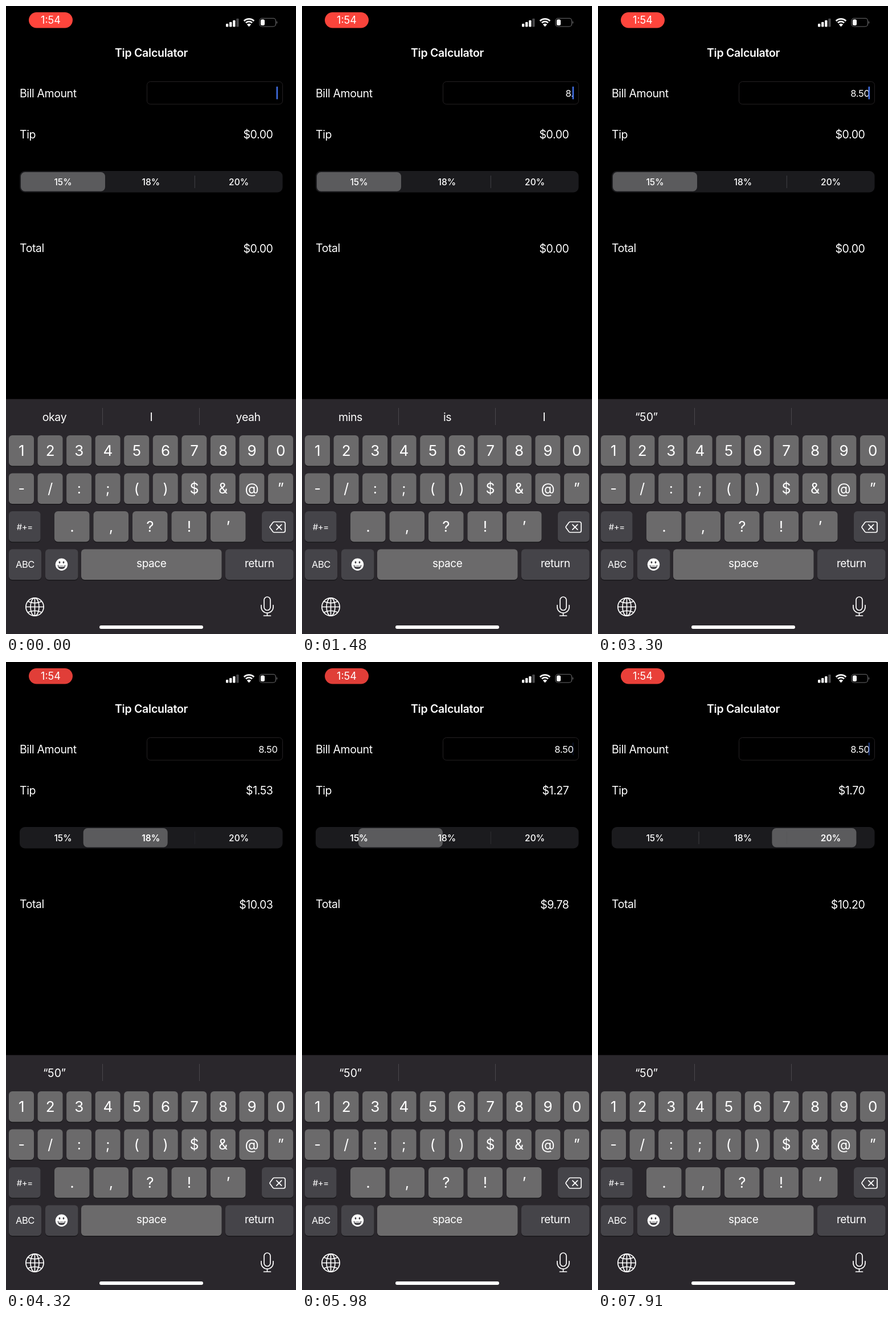
These frames come from a looping animation (509x1100 px, 8000 ms). An HTML page:

```html
<!DOCTYPE html>
<html lang="en">
<head>
<meta charset="utf-8">
<title>Tip Calculator</title>
<style>
html, body { margin: 0; width: 100%; height: 100%; overflow: hidden; background: #000; }
body { position: relative; font-family: Inter, Roboto, sans-serif; }
svg { position: absolute; left: 0; top: 0; display: block; }
text { fill: #fff; font-size: 19.5px; letter-spacing: -.4px; white-space: pre; }
.word { position: absolute; top: 707px; width: 170px; height: 26px; line-height: 26px; text-align: center; color: #fff; font-size: 19.5px; letter-spacing: -.4px; white-space: nowrap; }
.word span { display: inline-block; }
.line { fill: none; stroke: #fff; stroke-width: 1.7; stroke-linecap: round; stroke-linejoin: round; }
</style>
</head>
<body>
<svg id="stage" width="509" height="1100" viewBox="0 0 509 1100"></svg>
<script>
const LOOP = 8000, PULSE = 1692, BLINK = 845;
const BILL = [[0, ''], [450, '8'], [850, '8.'], [1690, '8.5'], [2086, '8.50']];
const WORDS = [[-1000, ['okay', 'I', 'yeah']], [860, ['mins', 'is', 'I']], [1690, ['', '', '']], [2086, ['“50”', '', '']]];
const PICKS = [[-1000, 0, '$0.00', '$0.00'], [4222, 1, '$1.53', '$10.03'], [5910, 0, '$1.27', '$9.78'], [7754, 2, '$1.70', '$10.20']];
const KNOB = [26, 181, 335.5];

const $ = id => document.getElementById(id);
const clamp = v => Math.max(0, Math.min(1, v));
const mix = (a, b, p) => a + (b - a) * p;
const rect = (x, y, w, h, r, fill, more = '') =>
  `<rect x="${x}" y="${y}" width="${w}" height="${h}" rx="${r}" fill="${fill}" ${more}/>`;
const label = (x, y, s, anchor = 'start', style = '', id = '') =>
  `<text x="${x}" y="${y}" text-anchor="${anchor}" style="${style}" id="${id}">${s}</text>`;
const line = (d, more = '') => `<path class="line" d="${d}" ${more}/>`;

function key(x, y, w, s = '', size = 26, dark = false, drop = 9.5) {
  return rect(x, y + 1.5, w, 53.5, 6, '#19181b') + rect(x, y, w, 53.5, 6, dark ? '#454449' : '#6b6a6b') +
    label(x + w / 2, y + 26.7 + drop, s.replace('&', '&amp;'), 'middle', `font-size:${size}px`);
}

function statusBar() {
  let s = rect(40, 11, 77, 27.5, 13.7, '#ff453b', 'id="pill"') +
    label(78.5, 31, '1:54', 'middle', 'font-size:18px;letter-spacing:0');
  for (let i = 0; i < 4; i++)
    s += rect(386 + i * 6.1, 31 - i * 3, 4.3, 5.5 + i * 3, 1.2, i < 3 ? '#fff' : '#48484a');
  const arc = (r, w) => {
    const k = r * Math.SQRT1_2;
    return `<path d="M${426.5 - k} ${35 - k}A${r} ${r} 0 0 1 ${426.5 + k} ${35 - k}" fill="none" stroke="#fff" stroke-width="${w}"/>`;
  };
  return s + arc(12.4, 2.8) + arc(7.8, 2.8) + '<path d="M426.5 36.3l-3.7-4a5.2 5.2 0 0 1 7.4 0z" fill="#fff"/>' +
    rect(445, 21.5, 28.5, 14.5, 4.5, 'none', 'stroke="#68686a" stroke-width="1.2"') +
    rect(447, 23.5, 7, 10.5, 2.5, '#fff') + '<path d="M475 26.3q2.4 2.4 0 5z" fill="#777"/>';
}

function form() {
  let s = label(255, 89, 'Tip Calculator', 'middle', 'font-weight:600;letter-spacing:-.25px') +
    label(24, 160, 'Bill Amount') + label(24, 231.5, 'Tip') + label(24, 431, 'Total') +
    rect(247.5, 132.5, 238, 39.5, 6, 'none', 'stroke="#242123"') +
    label(476.5, 158.5, '', 'end', 'font-size:16.5px;letter-spacing:-.3px', 'bill') +
    rect(474.5, 141, 2.6, 22.5, 1.3, '#416ee2', 'id="caret"') +
    label(468.5, 231.5, '', 'end', '', 'tip') + label(468.5, 432, '', 'end', '', 'total') +
    rect(24, 289, 461.5, 37.5, 9, '#1b1b1e') +
    rect(26, 291, 148, 33.5, 7.5, '#5b5b5d', 'id="knob"') +
    rect(176.5, 297, 1, 22, 0, '#434346', 'id="bar0"') + rect(330.8, 297, 1, 22, 0, '#434346', 'id="bar1"');
  ['15%', '18%', '20%'].forEach((t, i) => {
    s += label(100 + i * 154.3, 313.5, t, 'middle', 'font-size:15.5px;letter-spacing:0;font-weight:500', 'seg' + i);
  });
  return s;
}

function keyboard() {
  let s = rect(0, 688.5, 509, 412, 0, '#2a272c') +
    rect(169, 704, 1, 30, 0, '#49474b') + rect(339, 704, 1, 30, 0, '#49474b');
  ['1234567890', '-/:;()$&@”'].forEach((row, r) => [...row].forEach((c, i) => {
    s += key(5 + i * 50.55, 752 + r * 66.5, 44, c, r ? 25 : 26, false, r ? 8.8 : 9.5);
  }));
  s += key(5, 885, 55.5, '#+=', 15, true, 6.5);
  [...'.,?!’'].forEach((c, i) => { s += key(85 + i * 68.5, 885, 61.5, c, 26); });
  return s + key(449, 885, 55.5, '', 20, true) +
    line('M471 903.5H487q3 0 3 3V919q0 3-3 3H471q-1.4 0-2.4-1L463.5 914q-1-1.3 0-2.6L468.6 904.5q1-1 2.4-1z') +
    line('M474.8 908.3l8.8 8.8m0-8.8l-8.8 8.8') +
    key(5, 951.5, 57, 'ABC', 16.5, true, 6) + key(69, 951.5, 57.5, '', 20, true) +
    key(132, 951.5, 246.5, 'space', 19, false, 5) + key(385, 951.5, 119.5, 'return', 19, true, 5) +
    '<circle cx="97.5" cy="978.3" r="10.7" fill="#fff"/>' +
    '<g fill="#454449"><ellipse cx="94" cy="974.5" rx="1.4" ry="2"/><ellipse cx="101" cy="974.5" rx="1.4" ry="2"/>' +
    '<path d="M90.5 979.2q7 1.8 14 0q-.6 7-7 7t-7-7z"/></g>' +
    line('M92.6 981q4.9 1 9.8 0', 'style="stroke-width:1.5"') +
    '<g class="line"><circle cx="50.5" cy="1052.5" r="15.6"/><ellipse cx="50.5" cy="1052.5" rx="7.5" ry="15.6"/></g>' +
    line('M50.5 1037v31M35 1052.5h31M38.6 1043q11.9 5.5 23.8 0M38.6 1062q11.9-5.5 23.8 0') +
    line('M453 1040.5a5.5 5.5 0 0 1 11 0V1053a5.5 5.5 0 0 1-11 0z') +
    line('M448 1049.5V1053a10.5 10 0 0 0 21 0V1049.5M458.5 1063v5M452.5 1068h12') +
    rect(164, 1085, 182, 6, 3, '#fff');
}

$('stage').innerHTML = statusBar() + form() + keyboard();

// Every prediction is a row of separate letters, so they can come and go one by one.
const words = WORDS.map(([, set]) => set.map((word, col) => {
  const box = document.createElement('div');
  box.className = 'word';
  box.style.left = col * 170 + 'px';
  const letters = [...word].map(c => {
    const span = document.createElement('span');
    span.textContent = c;
    box.append(span);
    return span;
  });
  document.body.append(box);
  return letters;
}));

const lastIndex = (list, t) => list.reduce((found, row, i) => row[0] <= t ? i : found, 0);

function drawWords(t) {
  const now = lastIndex(WORDS, t), age = t - WORDS[now][0];
  words.forEach((set, w) => set.forEach(letters => letters.forEach((span, i) => {
    const fromEnd = letters.length - 1 - i;
    let alpha = 0, scale = 1;
    if (w === now) {
      alpha = clamp((age - 20 * fromEnd) / 40);
      scale = mix(.45, 1, alpha);
    } else if (w === now - 1) {
      alpha = 1 - clamp((age - 20 - 30 * fromEnd) / 100);
    }
    span.style.opacity = alpha;
    span.style.transform = `scale(${scale})`;
  })));
}

function drawPick(t) {
  const n = lastIndex(PICKS, t), [start, to, tip, total] = PICKS[n];
  const from = n ? PICKS[n - 1][1] : 0;
  const k = (t - start) * .025, p = 1 - (1 + k) * Math.exp(-k);
  const shown = (pick, bar) => pick === bar || pick === bar + 1 ? 0 : 1;
  $('knob').setAttribute('x', mix(KNOB[from], KNOB[to], p));
  for (let b = 0; b < 2; b++) $('bar' + b).style.opacity = mix(shown(from, b), shown(to, b), p);
  for (let i = 0; i < 3; i++) $('seg' + i).style.fontWeight = i === to && n ? 600 : 500;
  $('tip').textContent = tip;
  $('total').textContent = total;
}

function caretAlpha(t) {
  if (t < 2800) return 1;
  const phase = (t + 60) % BLINK;
  return phase < 290 ? 1 - clamp(phase / 145) : clamp((phase - 290) / 150);
}

function frame(ms) {
  const t = ms % LOOP;
  const glow = .5 + .5 * Math.cos(t / PULSE * 2 * Math.PI);
  $('pill').setAttribute('fill', `rgb(${mix(224, 255, glow)},${mix(62, 69, glow)},${mix(56, 60, glow)})`);
  $('bill').textContent = BILL[lastIndex(BILL, t)][1];
  $('caret').style.opacity = caretAlpha(t);
  drawPick(t);
  drawWords(t);
}

const begin = performance.now();
function tick() {
  frame(performance.now() - begin);
  requestAnimationFrame(tick);
}
tick();
</script>
</body>
</html>
```
